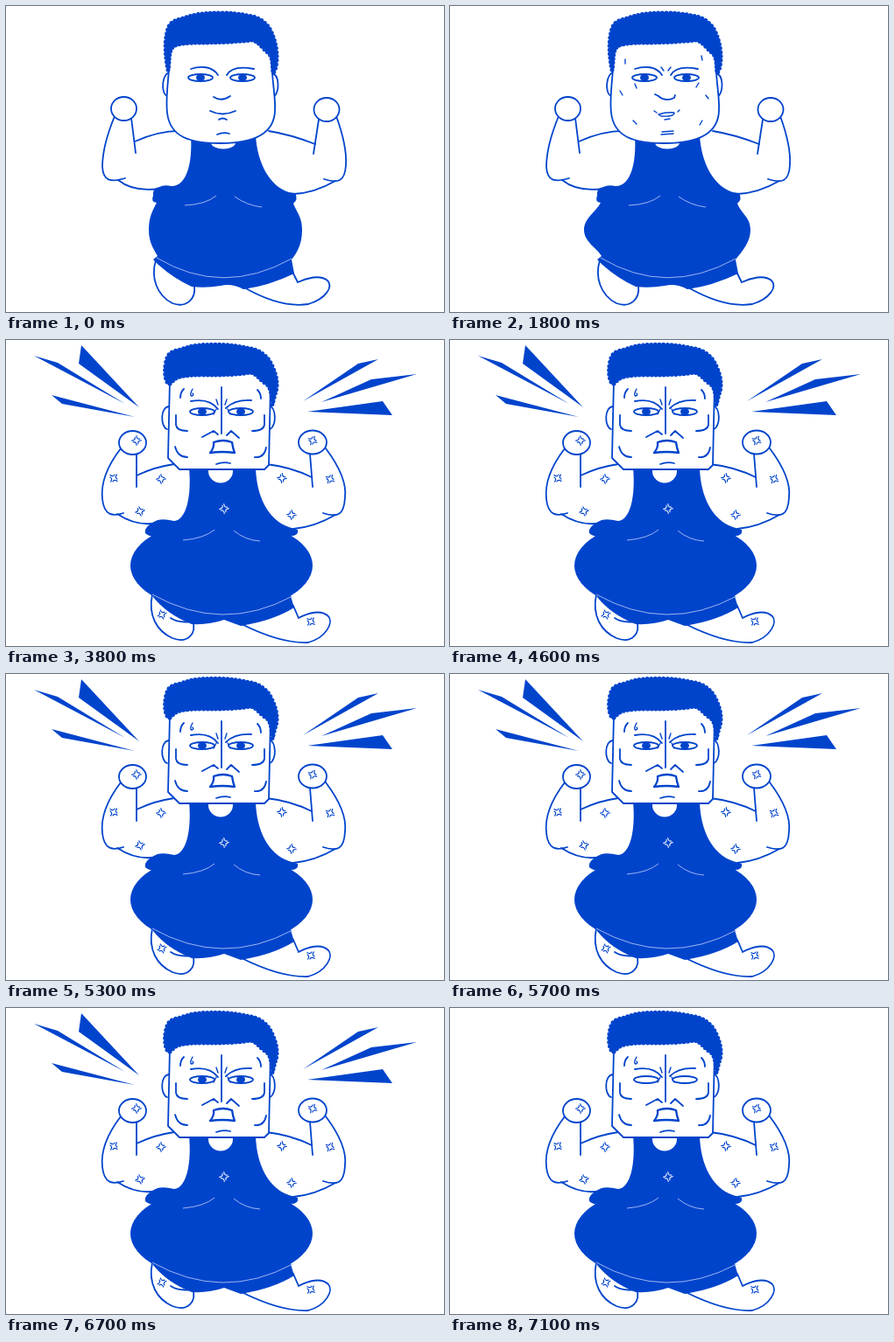
Write an HTML page that moves like this. It is 500 px wide and 350 px high and loops after 8 s.

```html
<!DOCTYPE html>
<html lang="en">
<head>
<meta charset="utf-8">
<title>Flexing dancer</title>
<style>
  html, body { margin: 0; width: 100%; height: 100%; overflow: hidden; background: #fff; }
  svg { display: block; width: 500px; height: 350px; }
  .line { fill: none; stroke: #0044cc; stroke-width: 1.8; stroke-linecap: round; stroke-linejoin: round; }
  .skin { fill: #fff; }
  .thin { stroke-width: 1.4; }
  .bold { stroke-width: 2.3; }
  .solid { fill: #0044cc; }
  .pale { fill: none; stroke: #9db5f0; stroke-width: 1; }
  .vein { stroke-width: 1.2; }
  .light { stroke: #dfe7fb; }
  .curls { fill: #0044cc; stroke: #0044cc; stroke-width: 5; stroke-linecap: round; stroke-dasharray: 0 4.6; }
</style>
</head>
<body>
<svg id="stage" viewBox="0 0 500 350"></svg>
<script>
const path = (cls, d) => `<path class="${cls}" d="${d}"/>`;
const oval = (cls, x, y, rx, ry = rx) => `<ellipse class="${cls}" cx="${x}" cy="${y}" rx="${rx}" ry="${ry}"/>`;
const eye = (x, y, rx) => oval('line skin', x, y, rx, 4);
const pupils = (a, b) => [a, b].map(x => oval('solid', x, 82, 5, 4)).join('');

// Popped vein: four short hooks around a point.
const vein = (x, y, cls = '') =>
  `<g transform="translate(${x} ${y}) rotate(${(x * 7 + y) % 60 - 30})">` +
  [0, 90, 180, 270].map(a =>
    `<path class="line vein ${cls}" transform="rotate(${a})" d="M1 -5.2Q.6 -1 4 -1"/>`).join('') + '</g>';

const hair = d => path('solid', d) + path('curls', d);

// Body shared by the first three stages; the belly widens with each.
function body(left, right) {
  return path('line skin', 'M171 291C165 310 172 331 190 340C206 346 217 335 215 320') +
    path('line skin', 'M272 322C300 338 325 344 345 341C365 335 374 321 367 314C359 307 343 311 333 316L327 304') +
    path('line', 'M147 155Q176 142 202 143M128 199Q145 213 175 209M300 143Q325 147 353 158M376 200Q352 214 328 215') +
    path('line', 'M124 126C115 148 110 167 110 184C111 200 119 202 136 197M143 128L148 168') +
    path('line', 'M377 126C385 148 389 167 388 182C387 201 379 203 363 198M357 130L351 169') +
    oval('line skin', 134.5, 117.5, 14.5, 13.5) + oval('line skin', 366, 118.5, 14.5, 13.5) +
    path('solid', `M211 148C213 178 207 206 189 206Q180 204 175 207Q167 208 168 217Q165 224 172 225
      C166 236 ${left} 243 ${left} 256C${left} 270 168 277 173 286L168 290L174 296Q192 312 212 321
      Q228 323 245 320Q258 317 271 324Q300 320 329 306L326 290
      C334 280 ${right} 270 ${right} 256C${right} 242 333 238 328 226Q334 221 330 214L323 213
      C301 206 287 180 285 148Z`) +
    oval('skin', 248, 156, 14, 7.5) +
    path('pale', 'M204 228Q228 227 240 217M261 218Q275 228 292 230M172 288Q247 333 326 289');
}

function roundHead(face) {
  return path('line skin', 'M188 76C178 75 176 100 184 103') + path('line skin', 'M303 77C313 78 312 100 306 103') +
    path('line skin', `M187 60C185 90 182 105 184 122C187 150 210 157 245 157
      C282 157 306 146 307 120C308 105 304 90 303 60`) +
    hair(`M185 73C182 58 181 42 184 30C186 20 190 17 199 15L212 11C228 7 262 7 275 11
      C288 12 298 19 303 30C309 44 311 60 307 73L305 77C304 67 305 60 300 54C292 48 288 40 281 39
      C262 41 240 42 222 42C208 42 196 43 191 46C185 52 187 62 185 73Z`) +
    path('line', 'M211 72C222 68 236 69 242 79M252 79C257 70 268 69 283 72') +
    eye(222, 82, 14) + eye(270, 82, 14) + pupils(222, 270) + face;
}

const calmMouth = path('line', 'M237 104Q246 110 256 103M233 120Q247 127 262 120M243 130Q247 127 252 130M241 147Q248 144 255 146');
const sweat = path('line thin', 'M200 61V66M287 57L288 62M211 89L213 94M284 88L281 93');
const strain = sweat +
  path('line thin', 'M194 97L197 102M292 102L295 106M209 131L213 135M288 131L285 136M241 70L244 74M252 70L249 74') +
  path('line', 'M234 101L238 103Q246 110 256 105L257 102') +
  path('line thin', 'M233 120L236 122M238 124Q247 121 256 122Q256 127 241 126ZM262 119L260 121M245 130L251 129M242 144L255 143M241 147L255 146');

function bigBody() {
  const veins = [[149, 115], [123, 158], [177, 159], [153, 196], [315, 158], [370, 159], [326, 200], [350, 115], [178, 314], [348, 322]];
  return path('line skin', 'M167 291C162 315 172 333 190 341C208 348 218 335 213 321M188 318Q197 324 211 322') +
    path('line skin', 'M269 325C295 338 322 347 345 346C366 340 374 323 368 316C360 308 345 312 334 318L328 304') +
    path('line', 'M149 155Q170 145 192 142M127 199Q150 214 173 209M297 142Q325 145 349 157M376 200Q352 214 328 216') +
    path('line', 'M131 124C115 145 108 165 110 182C112 201 122 202 134 198M149 130V168') +
    path('line', 'M365 124C380 144 389 164 387 180C386 201 378 203 362 198M347 130L350 168') +
    oval('line skin', 144.5, 117.5, 15.5, 13.5) + oval('line skin', 350, 117, 16, 13.5) +
    path('solid', `M209 146C212 178 206 206 192 207Q180 204 173 206Q157 213 159 221Q164 226 175 225
      L168 294Q184 314 212 325Q232 326 249 320L268 327Q305 321 329 306L325 293L322 224
      Q335 225 333 217L323 214C300 206 286 180 285 146Z`) +
    oval('solid', 246, 258, 104, 53) +
    oval('skin', 245, 150, 14, 13.5) +
    path('pale', 'M202 229Q226 227 238 217M260 218Q273 229 290 230M167 291Q247 336 327 293') +
    veins.map(v => vein(...v)).join('') + vein(249, 193, 'light');
}

function squareHead() {
  return path('line skin', 'M186 76C176 77 176 99 184 102') + path('line skin', 'M300 75C309 77 309 99 301 102') +
    path('line skin', 'M187 46L185 135L198 148H295L300 143L302 50') +
    hair(`M184 48C181 42 181 32 183 24C185 15 189 13 199 11L212 7C230 4 260 5 274 9
      C287 10 298 17 303 28C309 40 311 52 307 62L304 74C303 62 303 55 297 50C290 46 286 38 279 37
      C262 40 245 40 225 40C208 40 198 41 192 45L187 50Z`) +
    path('line', 'M211 70Q232 66 242 79M251 78Q261 68 280 69M246 54V107') +
    path('line thin', 'M240 68L242 74M252 68L250 74M240 79L237 85M253 79L256 85M213 56Q209 63 212 64Q215 63 213 61') +
    eye(224, 82, 14) + eye(268, 82, 14) +
    path('line', 'M224 111L237 104L242 108M252 109L257 104L266 112') +
    path('line bold skin', 'M237 117Q248 113 258 117Q259 124 261 129Q247 127 233 129Q238 123 237 117Z') +
    path('line', 'M203 56Q199 60 199 66M287 57Q291 61 291 67M194 86V97Q195 104 207 104M295 86V97Q294 104 281 104') +
    path('line', 'M193 122Q196 134 207 134M297 123Q295 135 284 134M240 142Q248 139 256 141');
}

const rayPoints = [
  '32,18 59,26 136,73', '86,6 83,27 152,77', '52,63 64,73 147,88',
  '425,22 402,27 339,70', '469,39 417,45 360,71', '430,70 441,86 344,82'
];

const stages = [
  body(163, 338) + roundHead(calmMouth),
  body(158, 340) + roundHead(calmMouth + sweat),
  body(153, 343) + roundHead(strain),
  bigBody() + squareHead() + `<g id="pupils">${pupils(224, 268)}</g>`
];

const svg = document.getElementById('stage');
svg.innerHTML =
  `<g id="rays">${rayPoints.map(p => `<polygon class="solid" points="${p}"/>`).join('')}</g>` +
  `<g id="dancer">${stages.map(s => `<g class="pose">${s}</g>`).join('')}</g>`;

const rays = document.getElementById('rays');
const dancer = document.getElementById('dancer');
const look = document.getElementById('pupils');
const poses = [...svg.querySelectorAll('.pose')];

// [stage, step length in ms, number of steps]
const beats = [[0, 500, 2], [1, 400, 2], [2, 300, 6], [3, 200, 8], [3, 100, 19], [3, 900, 1]];
const steps = [];
let total = 0;
for (const [stage, length, count] of beats) {
  for (let k = 0; k < count; k++) {
    const i = steps.length;
    const flip = stage < 3 ? i % 2 === 1 : i % 2 === 0;
    steps.push({ stage, flip, start: total });
    total += length;
  }
}
const last = steps.length - 1;

const show = (el, on) => el.setAttribute('display', on ? 'inline' : 'none');

function draw(i) {
  const { stage, flip } = steps[i];
  const size = flip && i < last - 1 ? 0.93 : 1;
  poses.forEach((pose, k) => show(pose, k === stage));
  show(rays, stage === 3 && i < last);
  show(look, i < last);
  dancer.setAttribute('transform', flip ? 'translate(499 0) scale(-1 1)' : '');
  rays.setAttribute('transform', `translate(250 80) scale(${size}) translate(-250 -80)`);
}

const origin = performance.now();
let current = -1;
function tick() {
  const t = (performance.now() - origin) % total;
  const i = steps.findLastIndex(s => s.start <= t);
  if (i !== current) draw(current = i);
  requestAnimationFrame(tick);
}
tick();
</script>
</body>
</html>
```
